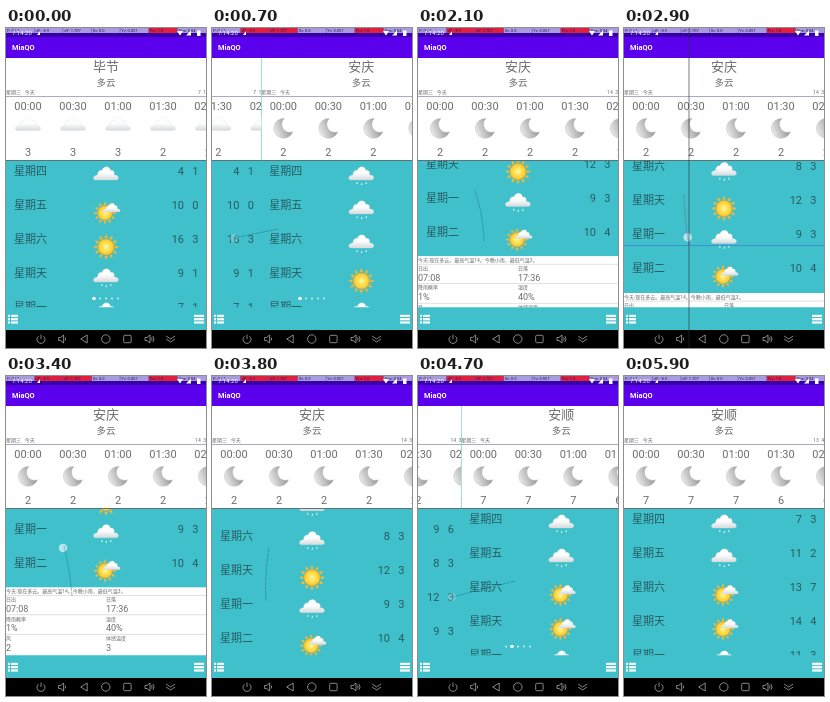
Recreate the animation shown at these times as an HTML page. Size 200 by 320 pixels, loop 6 s.

```html
<!DOCTYPE html>
<html lang="zh">
<head>
<meta charset="utf-8">
<title>Weather</title>
<style>
html, body { margin: 0; width: 100%; height: 100%; overflow: hidden; background: #000; }
svg { display: block; width: 100%; height: 100%; }
text { font-family: Roboto, "Noto Sans CJK SC", "Noto Sans CJK", sans-serif; white-space: pre; }
</style>
</head>
<body>
<svg id="stage" viewBox="0 0 200 320" xmlns="http://www.w3.org/2000/svg"></svg>
<script>
const LOOP = 6000, STEP = 100;
const TEAL = '#40c0ca', GREY = '#6c6c6c', INK = '#285b61', LILAC = '#a99bdc', RED = '#e0203c';

// y is the vertical middle of the glyphs
const txt = (x, y, size, s, fill = GREY, anchor = 'start', extra = '') =>
  `<text x="${x}" y="${y + size * 0.36}" font-size="${size}" fill="${fill}" text-anchor="${anchor}" ${extra}>${s}</text>`;
const rect = (x, y, w, h, fill, extra = '') => `<rect x="${x}" y="${y}" width="${w}" height="${h}" fill="${fill}" ${extra}/>`;
const at = (x, y, s, k = 1) => `<g transform="translate(${x} ${y}) scale(${k})">${s}</g>`;
const repeat = (n, f) => Array.from({ length: n }, (_, i) => f(i)).join('');

const cloud = '<path d="M-11 6C-14 5-12.5 1-8.5 1C-8.5-3-5.5-4.5-4-3.5C-3-8.5 4-8.5 4.5-3.5C7.5-4.5 9 -1.5 8 1C13 .5 14 6 10 6Z" fill="url(#cloudFill)" stroke="#d3d9dc" stroke-width=".3"/>';
const drops = repeat(3, i => `<path d="M${i * 4.5 - 4} ${7.5 + i % 2}l-1.1 2.6h1.7z" fill="#e4f4fa"/>`);
const sun = repeat(12, i => `<path d="M-1.7-9L0-13L1.7-9Z" transform="rotate(${i * 30})" fill="#f7b733"/>`) +
  '<circle r="8" fill="url(#sunFill)" stroke="#f0ad2a" stroke-width=".8"/>';
const moon = '<path d="M1-10A10.4 10.4 0 1 0 10 4A8.5 8.5 0 0 1 1-10Z" fill="url(#moonFill)" stroke="#b4b4b4" stroke-width=".4"/>';

const icons = {
  cloud: at(0, 2, cloud),
  rain: at(0, 2, cloud + drops),
  sun: at(0, 7, sun),
  part: at(-1, 7, sun, 0.9) + at(6, 2, cloud, 0.66),
  moon: at(0, 5.5, moon, 0.95)
};

const days = [...'四五六天一二'];
const hours = ['00:00', '00:30', '01:00', '01:30', '02:00'];
const pages = [
  { city: '毕节', today: '7  1', sky: 'cloud', temps: '33322',
    rows: 'cloud 4 1, part 10 0, sun 16 3, rain 9 1, rain 7 1, cloud 8 2' },
  { city: '安庆', today: '14  3', sky: 'moon', temps: '22222',
    rows: 'rain 13 8, rain 9 6, rain 8 3, sun 12 3, rain 9 3, part 10 4' },
  { city: '安顺', today: '13  4', sky: 'moon', temps: '77766',
    rows: 'rain 7 3, rain 11 2, part 13 7, part 14 4, cloud 11 3, part 12 4' }
];
const facts = ['日出 07:08 日落 17:36', '降雨概率 1% 湿度 40%', '风 2 体感温度 3'];

function details() {
  return rect(0, 0, 200, 80, '#fff') +
    txt(0, 4, 5, '今天:现在多云。最高气温14。今晚小雨，最低气温3。') +
    facts.map((line, i) => {
      const y = 12 + i * 19.5, [a, b, c, d] = line.split(' ');
      return rect(0, y - 4.2, 200, 0.5, '#c4c4c4') + txt(0, y, 5, a) + txt(100, y, 5, c) +
        txt(0, y + 9.3, 9, b) + txt(100, y + 9.3, 9, d);
    }).join('');
}

function page(p, i) {
  const strip = hours.map((h, k) => {
    const x = 22 + k * 45;
    return txt(x, 78.5, 11, h, GREY, 'middle') + at(x, 94.5, icons[p.sky]) +
      txt(x, 124, 11, p.temps[k], GREY, 'middle');
  }).join('');
  const list = p.rows.split(', ').map((row, k) => {
    const y = 143 + k * 34, [icon, hi, lo] = row.split(' ');
    return txt(8, y, 11, '星期' + days[k], INK) + at(100, y + 1, icons[icon]) +
      txt(178, y, 11, hi, INK, 'end') + txt(192.5, y, 11, lo, INK, 'end');
  }).join('');
  return `<g id="page${i}"><g clip-path="url(#pageClip)">` + rect(0, 30, 200, 102, '#fff') +
    txt(100, 38.5, 13, p.city, GREY, 'middle') + txt(100, 54.7, 9.5, '多云', GREY, 'middle') +
    txt(0, 64.5, 5, '星期三   今天') + txt(200, 64.5, 5, p.today, GREY, 'end') +
    rect(0, 68, 200, 0.7, '#8587b4') + strip + rect(0, 132, 200, 1, '#5f7175') +
    `<g clip-path="url(#listClip)"><g id="list${i}">${list}${at(0, 337.5, details())}</g></g></g></g>`;
}

function topBar() {
  const cells = ['P: 0 / 1', 'dX: -8.9', 'dY: 1.707', 'Xv: 0.0', 'Yv: 0.057', 'Prs: 1.0', 'Size: 0.04'];
  const w = 200 / cells.length;
  return rect(0, 0, 200, 9, '#3800a8') + rect(0, 0, 200, 5, LILAC) +
    rect(w, 0, w * 2, 5, RED, 'id="delta"') + rect(w * 5, 0, w, 5, RED) +
    cells.map((c, i) => rect(i * w - 0.5, 0, 0.5, 5, '#6046b0') + txt(i * w + 1, 2.4, 4, c, '#2b1a58')).join('') +
    txt(6, 5, 6, '7:14:20', '#fff') +
    '<path d="M31 7l3-4v4z M171 3h6l-3 4.5z M180 7.5l5-5v5z" fill="#fff"/>' + rect(191, 2.5, 3.5, 5.5, '#fff') +
    rect(0, 9, 200, 21, '#5a00ec') + txt(6, 19.5, 7.4, 'MiaQO', '#fff', 'start', 'font-weight="700"');
}

function navBar() {
  const speaker = '<path d="M-4-1.5h2l3-2.5v8l-3-2.5h-2zM2.5-1.5q1.2 1.5 0 3"/>';
  const marks = [
    '<path d="M-2.4-2.8A4 4 0 1 0 2.4-2.8M0-4.5V0"/>',
    speaker,
    '<path d="M3-4V4L-3.5 0Z"/>',
    '<circle r="4.2"/>',
    '<rect x="-3.7" y="-3.7" width="7.4" height="7.4" rx="1"/>',
    speaker + '<path d="M3.8-3q2.6 3 0 6"/>',
    '<path d="M-4.5-3L0 0L4.5-3M-4.5 0L0 3L4.5 0"/>'
  ];
  return rect(0, 302, 200, 18, '#000') +
    `<g fill="none" stroke="#a8a8a8" stroke-width=".8">${marks.map((s, i) => at(35 + i * 21.6, 311, s)).join('')}</g>`;
}

const menus = () => repeat(3, i => {
  const y = 286.8 + i * 3.3;
  return rect(2, y, 2, 2.2, '#fff') + rect(5, y, 7, 2.2, '#fff') + rect(188, y, 10, 2.2, '#fff');
});

const grad = (type, id, place, ...colors) => `<${type}Gradient id="${id}" ${place}>` +
  colors.map((c, i) => `<stop offset="${i / (colors.length - 1)}" stop-color="${c}"/>`).join('') + `</${type}Gradient>`;
const clip = (id, y, h) => `<clipPath id="${id}"><rect y="${y}" width="200" height="${h}"/></clipPath>`;

document.getElementById('stage').innerHTML =
  '<defs>' + grad('linear', 'cloudFill', 'x2="0" y2="1"', '#fff', '#fbfcfc', '#d5dadd') +
  grad('radial', 'sunFill', '', '#fff6b8', '#ffe14a', '#fcc42c') +
  grad('linear', 'moonFill', 'y1=".7" y2=".3"', '#ededed', '#b9b9b9', '#858585') +
  clip('pageClip', 30, 249.5) + clip('listClip', 133, 146.5) + '</defs>' +
  rect(0, 30, 200, 272, TEAL) + pages.map(page).join('') + topBar() + menus() + navBar() +
  '<g id="dots">' + repeat(5, i => `<circle cx="${88 + i * 6}" cy="270.5" fill="#fff"/>`) + '</g>' +
  '<circle id="finger" r="4.3" fill="#d3edf5"/>' +
  '<path id="trail" fill="none" stroke-width=".6" stroke-dasharray="4 .8"/>' +
  '<path id="lineX" stroke="#26343f" stroke-width=".7"/><path id="lineY" stroke="#3f74d8" stroke-width=".7"/>';

const $ = id => document.getElementById(id);
const dots = [...$('dots').children];

// glide: distance covered after the finger lifts
const swipe = (start, end, from, to) =>
  ({ start, end, from, to, axis: 0, bow: 0, glide: 200 - from[0] + to[0], rest: 400 });
const drag = (start, end, from, to, bow, glide) =>
  ({ start, end, from, to, axis: 1, bow, glide, rest: 600 });

const strokes = [
  swipe(400, 600, [66, 201], [22, 210]),
  drag(1600, 1900, [66, 213], [57, 163], 4, 74),
  drag(2400, 2900, [60, 166], [65, 217.5], -2, -16),
  drag(3100, 3300, [66, 220], [58, 170], 2, 38),
  drag(3400, 3680, [57, 172], [54, 225], -3, -68),
  swipe(4400, 4600, [97, 205], [34, 221]),
  drag(5600, 5800, [193, 290], [193, 290], 0, 0)
];

const part = (t, start, length) => Math.max(0, Math.min(1, (t - start) / length));
const mix = (p, q, u) => p.map((v, i) => v + (q[i] - v) * u);
const bend = s => mix(s.from, s.to, 0.5).map((v, i) => i ? v : v + s.bow);
const progress = (s, t) => part(t, s.start, s.end - s.start);

function point(s, t) {
  const u = progress(s, t), m = bend(s);
  return mix(mix(s.from, m, u), mix(m, s.to, u), u);
}

// follow the finger, then coast with a quartic ease-out
function shift(s, t) {
  const coast = 1 - (1 - part(t, s.end, s.rest)) ** 4;
  return (s.from[s.axis] - s.to[s.axis]) * progress(s, t) + s.glide * coast;
}
const offset = (axis, t) => strokes.reduce((sum, s) => s.axis === axis ? sum + shift(s, t) : sum, 0);

const set = (id, name, v) => $(id).setAttribute(name, v);
const show = (id, v) => set(id, 'opacity', v);

function drawTouch(t) {
  // the pointer lines lag one step behind the dot
  const touch = strokes.filter(s => t >= s.start).pop();
  const drawn = strokes.filter(s => t > s.start).pop();
  const down = drawn && drawn === touch && t <= drawn.end;
  show('trail', drawn ? 0.7 : 0);
  show('lineX', down ? 0.9 : 0);
  show('lineY', down ? 0.9 : 0);
  show('delta', drawn && !down && drawn.glide ? 1 : 0);
  if (drawn) {
    const [x, y] = point(drawn, t);
    set('trail', 'd', `M${drawn.from}Q${mix(drawn.from, bend(drawn), progress(drawn, t))} ${x} ${y}`);
    set('trail', 'stroke', down ? '#8a4450' : '#175d75');
    set('lineX', 'd', `M${x} 0V320`);
    set('lineY', 'd', `M0 ${y}H200`);
  }
  show('finger', !touch || t > touch.end + STEP ? 0 : t > touch.end ? 0.25 : 0.8);
  if (touch) set('finger', 'transform', `translate(${point(touch, t - STEP * 0.8)})`);
}

function draw(t) {
  const x = offset(0, t), active = Math.round(x / 200 - 0.35);
  pages.forEach((_, i) => {
    const left = i * 200 - x;
    set('page' + i, 'transform', `translate(${left})`);
    set('page' + i, 'visibility', Math.abs(left) < 200 ? 'visible' : 'hidden');
  });
  set('list1', 'transform', `translate(0 ${-offset(1, t)})`);
  dots.forEach((d, i) => {
    d.setAttribute('r', i === active ? 1.8 : 1);
    d.setAttribute('opacity', i === active ? 1 : 0.75);
  });
  show('dots', t < 1700 || (t >= 4400 && t < 5700) ? 1 : 0);
  drawTouch(t);
}

const begin = performance.now();
function tick(now) {
  const t = Math.max(0, now - begin) % LOOP;
  draw(Math.floor(t / STEP) * STEP);
  requestAnimationFrame(tick);
}
draw(0);
requestAnimationFrame(tick);
</script>
</body>
</html>
```
